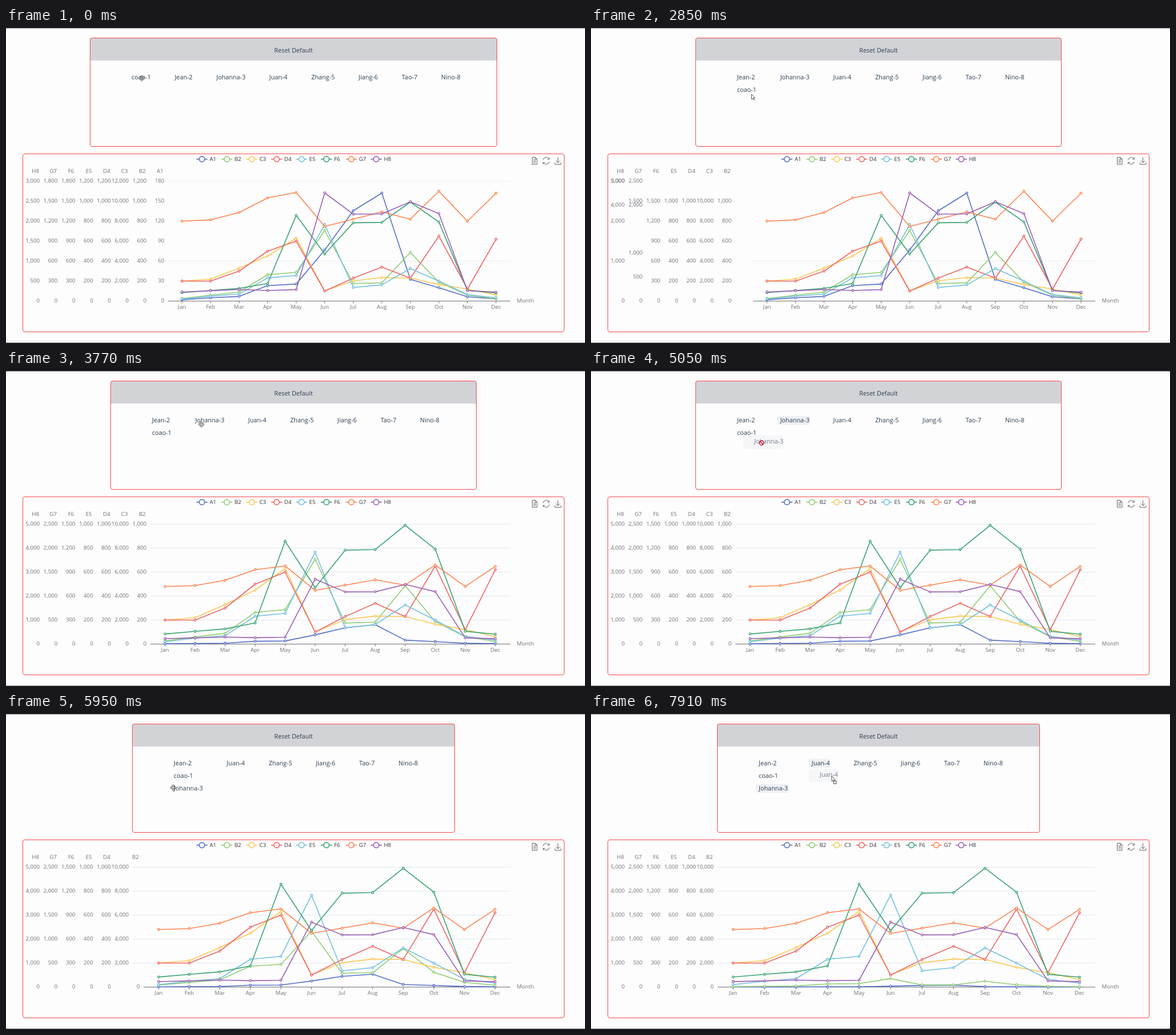
An HTML page that plays this animation: 1015 px wide and 552 px high, repeating every 8 s.

```html
<!DOCTYPE html>
<html lang="en">
<head>
<meta charset="utf-8">
<title>Draggable axis groups</title>
<style>
  html, body { margin: 0; width: 100%; height: 100%; overflow: hidden; background: #fdfdfd; }
  svg { display: block; width: 100%; height: 100%; font-family: "Open Sans", "Noto Sans", sans-serif; }
  .axis { font-size: 9.7px; fill: #6e7079; }
  .legend { font-size: 9.7px; fill: #333; }
  .item { font-size: 10.85px; fill: #2c3e50; }
  .crisp { shape-rendering: crispEdges; }
</style>
</head>
<body>
<svg id="stage" viewBox="0 0 1015 552"></svg>
<script>
// The screen refreshes on a steady tick; all motion below is timed in ticks.
const LOOP = 8000, TICK = 129, LEAD = 1170;
const BASE = 478.5, HEIGHT = 210, RIGHT = 884;
const MONTHS = 'Jan Feb Mar Apr May Jun Jul Aug Sep Oct Nov Dec'.split(' ');
const AXES = 'A1 B2 C3 D4 E5 F6 G7 H8'.split(' ');
const COLORS = '#5470c6 #91cc75 #fac858 #ee6666 #73c0de #3ba272 #fc8452 #9a60b4'.split(' ');
const ITEMS = 'coao-1 Jean-2 Johanna-3 Juan-4 Zhang-5 Jiang-6 Tao-7 Nino-8'.split(' ');

const lerp = (a, b, p) => a + (b - a) * p;
const clamp = p => Math.max(0, Math.min(1, p));
const cubicInOut = p => p < .5 ? 4 * p ** 3 : 1 - 4 * (1 - p) ** 3;

// Monthly curves; the eight series are rescaled or lifted copies of them.
const vapour = [2, 4.9, 7, 23.2, 25.6, 76.7, 135.6, 162.2, 32.6, 20, 6.4, 3.3];
const rain = [26, 59, 90, 264, 287, 707, 175.6, 182.2, 487, 188, 60, 23];
const warmth = [20, 22, 33, 45, 63, 10.2, 20.3, 23.4, 23, 16.5, 12, 6.2];
const heat = [20, 22, 33, 55, 63, 12, 23, 34, 23, 65, 20, 62];
const winter = i => i < 3 || i > 9;
const DATA = [
  vapour,
  rain,
  warmth.map(v => v * 100),
  heat.map((v, i) => i < 6 ? Math.floor(v / 10) * 100 : i === 10 ? 120 : v * 10),
  vapour.map(v => v > 100 ? v : v * 10),
  rain.map((v, i) => v + (winter(i) ? 100 : i === 3 || i === 5 ? 0 : 1000)),
  heat.map(v => 1000 + v * 10),
  rain.map((v, i) => v + (winter(i) ? 200 : i < 5 ? 0 : 2000))
];

// Smallest round step that reaches the peak in n intervals.
function niceStep(peak, n) {
  const unit = 10 ** Math.floor(Math.log10(peak / n));
  return unit * [1, 2, 3, 5, 10].find(m => m * unit * n >= peak);
}

// guests: series that have given up their own axis and share the one of B2
function makeView(n, guests) {
  const host = k => guests.includes(k) ? 1 : k;
  const steps = DATA.map((_, k) => {
    const peers = DATA.filter((_, j) => host(j) === host(k));
    return niceStep(Math.max(...peers.flat()), n);
  });
  let column = guests.length;
  return {
    n, steps,
    left: 283.5 - 31 * guests.length,
    scale: steps.map(s => s * n),
    slot: DATA.map((_, k) => guests.includes(k) ? -1 : column++)
  };
}
const VIEWS = [makeView(6, []), makeView(5, [0]), makeView(5, [0, 2])];

// Pointer glides: first tick, last tick, end x, end y, shape.
const GLIDES = [
  [-9, -1, 238, 88, 'move'], [-1, 3, 254.5, 104, 'copy'], [3, 8, 287, 95, 'copy'],
  [12, 13, 281.5, 116, 'arrow'], [15, 18, 329, 102, 'arrow'], [18, 21, 349, 89, 'move'],
  [26, 30, 299, 126, 'deny'], [30, 32, 293, 129, 'deny'], [35, 36, 293, 129, 'move'],
  [37, 41, 421, 86, 'arrow'], [41, 43, 407, 84, 'move'], [48, 52, 422, 109, 'copy']
];
const DRAGS = [
  { name: ITEMS[0], from: 0, to: 13, grab: 20.5 },
  { name: ITEMS[2], from: 27, to: 36, grab: 13 },
  { name: ITEMS[3], from: 49, to: 60, grab: 21 }
];

const pen = document.createElement('canvas').getContext('2d');
pen.font = '10.85px "Open Sans", "Noto Sans", sans-serif';
const widthOf = s => pen.measureText(s).width;

const rect = (x, y, w, h, fill, more = '') =>
  `<rect x="${x}" y="${y}" width="${w}" height="${h}" fill="${fill}" ${more}/>`;
const line = (x1, y1, x2, y2, color, more = '') =>
  `<path d="M${x1} ${y1}L${x2} ${y2}" stroke="${color}" ${more}/>`;
const text = (x, y, s, cls, anchor = 'start', more = '') =>
  `<text x="${x}" y="${y}" class="${cls}" text-anchor="${anchor}" ${more}>${s}</text>`;
const frame = (x, y, w, h) => rect(x, y, w, h, 'none', 'rx="3.5" stroke="#f8494c"');

function viewAt(k) {
  const ease = start => cubicInOut(clamp((k - start) * TICK / 300));
  if (k < 13) return { from: VIEWS[0], to: VIEWS[0], p: 1 };
  return k < 36 ? { from: VIEWS[0], to: VIEWS[1], p: ease(13.59) }
    : { from: VIEWS[1], to: VIEWS[2], p: ease(35.94) };
}

// Values present on both scales slide; new ones appear in place.
function yAxes(k, { from, to, p }) {
  const column = slot => 277.5 - 31.2 * slot;
  const left = lerp(from.left, to.left, p);
  const grid = new Map();
  let labels = '';
  AXES.forEach((name, a) => {
    if (to.slot[a] < 0) return;
    const x = column(lerp(from.slot[a], to.slot[a], p));
    labels += text(x - 7.5, 253.8, name, 'axis', 'middle');
    for (let i = 0; i <= to.n; i++) {
      const v = to.steps[a] * i;
      const kept = v <= from.scale[a] && v % from.steps[a] === 0;
      const y = BASE - HEIGHT * (kept ? lerp(v / from.scale[a], i / to.n, p) : i / to.n);
      labels += text(kept ? x : column(to.slot[a]), y + 2.5, v.toLocaleString('en-US'), 'axis', 'end');
      const row = Math.floor(y) + .5;
      if (i) grid.set(row, Math.min(grid.get(row) || RIGHT, kept ? left : to.left));
    }
  });
  let lines = '';
  if (k < 14) {
    for (const y of k < 13 ? [268.5, 408.5] : [408.5]) lines += line(left, y, RIGHT, y, '#efeff1');
  } else {
    grid.forEach((x, y) => lines += line(x, y, RIGHT, y, '#e0e6f1'));
  }
  return `<g class="crisp">${lines}</g>${labels}`;
}

function chart(k) {
  const view = viewAt(k), { from, to, p } = view;
  const left = lerp(from.left, to.left, p), band = (RIGHT - left) / 12;
  const px = i => left + band * (i + .5);
  let out = yAxes(k, view) + line(left, BASE, RIGHT, BASE, '#6e7079', 'class="crisp"');
  MONTHS.forEach((m, i) => {
    out += line(px(i), BASE, px(i), BASE + 4, '#6e7079') + text(px(i), 492.4, m, 'axis', 'middle');
  });
  out += text(895.5, 481.2, 'Month', 'axis');
  DATA.forEach((values, s) => {
    const rate = HEIGHT * lerp(1 / from.scale[s], 1 / to.scale[s], p);
    const pts = values.map((v, i) => [px(i).toFixed(2), (BASE - v * rate).toFixed(2)]);
    out += `<g stroke="${COLORS[s]}" stroke-width="1.6" stroke-linejoin="bevel">` +
      `<polyline points="${pts.join(' ')}" fill="none"/>` +
      pts.map(([x, y]) => `<circle cx="${x}" cy="${y}" r="1.75" fill="#fff" stroke-width="1.4"/>`).join('') + '</g>';
  });
  return out;
}

function legend() {
  return AXES.map((name, k) => {
    const x = 343.5 + 43.65 * k;
    return line(x - 9.7, 229.8, x + 9.7, 229.8, COLORS[k], 'stroke-width="1.6"') +
      `<circle cx="${x}" cy="229.8" r="4.7" fill="#fff" stroke="${COLORS[k]}" stroke-width="1.6"/>` +
      text(x + 13.4, 233, name, 'legend');
  }).join('');
}

function tools() {
  return `<g fill="none" stroke="#666">
    <path d="M922.5 226.5h5.5l3 3v9.5h-8.5zM928 226.5v3h3M924.5 231h4.5M924.5 233.5h4.5M924.5 236h4.5"/>
    <path d="M941.3 231.5a5.7 5.7 0 0 1 10.6-1.8M952.7 234a5.7 5.7 0 0 1-10.6 1.8M952.3 226.8v3.2h-3.2M941.7 238.7v-3.2h3.2"/>
    <path d="M967.5 226.5v9.5M963.7 232.3l3.8 3.8 3.8-3.8M962.3 235.5v3.5h10.6v-3.5"/></g>`;
}

// A dragged item joins the second column; its empty column goes on release.
function layoutAt(k) {
  const gap = 41.7, padLeft = 72.5, padding = 137;
  const cols = ITEMS.map(name => [name]);
  const join = (i, released) => {
    cols[1].push(ITEMS[i]);
    cols[i] = released ? null : [];
  };
  if (k >= 5) join(0, k >= 13);
  if (k >= 31) join(2, k >= 36);
  const shown = cols.filter(Boolean);
  const widths = shown.map(c => Math.max(0, ...c.map(widthOf)));
  const total = widths.reduce((a, b) => a + b) + gap * (shown.length - 1) + padding;
  const left = Math.floor(504 - total / 2) + .5;
  const spots = {};
  let x = left + padLeft;
  shown.forEach((c, i) => {
    c.forEach((name, row) => spots[name] = { x, y: 90.3 + 22 * row });
    x += widths[i] + gap;
  });
  return { left, spots };
}

function pointerAt(k) {
  const i = Math.max(0, GLIDES.findLastIndex(g => g[0] < k));
  const [start, end, x, y, kind] = GLIDES[i];
  const [, , x0, y0] = GLIDES[Math.max(0, i - 1)];
  const p = clamp((k - start) / (end - start));
  return { x: lerp(x0, x, p), y: lerp(y0, y, p), kind };
}

function pointer({ x, y, kind }) {
  const arrow = '<path d="M0 0V8.8L2 7L3.4 10L4.9 9.3L3.5 6.4H6.2Z" fill="#fff" stroke="#333" stroke-width=".8"/>';
  const shapes = {
    arrow,
    copy: arrow + rect(3.2, 8.5, 4.6, 4.6, '#fff', 'stroke="#333" stroke-width=".9"'),
    deny: '<circle r="3.7" fill="#fff" stroke="#d0142c" stroke-width="1.5"/>' +
      line(-2.6, -2.6, 2.6, 2.6, '#d0142c', 'stroke-width="1.5"'),
    move: [0, 90, 180, 270].map(a => `<path transform="rotate(${a})" fill="#fff" stroke="#333" stroke-width=".8"
      d="M-.8 -1V-3H-2.2L0 -5.3L2.2 -3H.8V-1"/>`).join('')
  };
  return `<g transform="translate(${x.toFixed(2)} ${y.toFixed(2)})">${shapes[kind]}</g>`;
}

function panel(k) {
  const { left, spots } = layoutAt(k), width = 1008 - 2 * left;
  const drag = DRAGS.find(d => k >= d.from && k < d.to);
  const mouse = pointerAt(k);
  const mark = name => rect(spots[name].x - 5, spots[name].y - 11.5, widthOf(name) + 6, 15.5, '#eef0f4', 'rx="2"');
  let out = rect(left, 18, width, 39, '#d2d3d7') + frame(left, 17.5, width, 190) +
    text(504, 42.6, 'Reset Default', 'item', 'middle');
  if (k >= 38) out += mark(ITEMS[2]);
  if (drag) out += mark(drag.name);
  for (const name of ITEMS) out += text(spots[name].x, spots[name].y, name, 'item');
  if (drag) {
    const x = mouse.x - drag.grab, y = mouse.y - 2.5;
    out += rect(x - 19, y - 11, widthOf(drag.name) + 19, 24, '#f1f2f6', 'rx="4" opacity=".6"') +
      text(x, y + 3.8, drag.name, 'item', 'start', 'opacity=".65"');
  }
  return out + pointer(mouse);
}

const stage = document.getElementById('stage');
const fixed = rect(0, 0, 1015, 552, '#fdfdfd') + rect(0, 0, 1015, 1, '#929292') + rect(0, 551, 1015, 1, '#929292') +
  frame(29.5, 220.5, 949, 312) + legend() + tools();
const start = performance.now();
let shown = null;

function draw() {
  const t = (performance.now() - start) % LOOP;
  const k = Math.max(-1, Math.floor((t - LEAD) / TICK));
  if (k !== shown) {
    shown = k;
    stage.innerHTML = fixed + chart(k) + panel(k);
  }
  requestAnimationFrame(draw);
}
draw();
</script>
</body>
</html>
```
